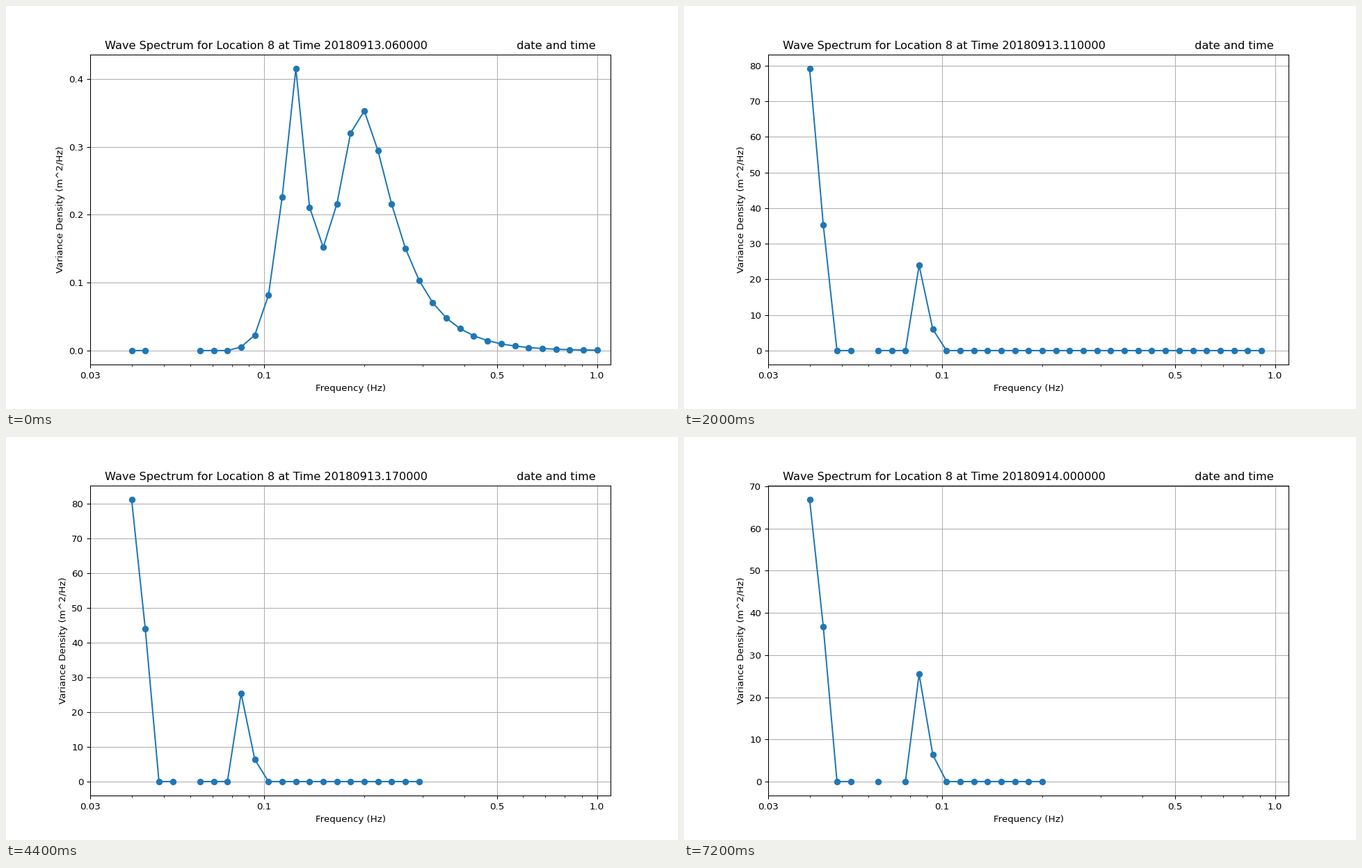
These frames come from a looping animation (966 by 580 pixels, 7.6 s). A matplotlib script:

```python
import numpy as np
import matplotlib.pyplot as plt
from matplotlib.animation import FuncAnimation
from matplotlib.ticker import NullFormatter

HOURS = 19
FIRST_HOUR = 6
DPI = 96.6
BANDS = np.arange(35)
FREQS = np.geomspace(0.04, 1.0, len(BANDS))


def calm_spectrum():
    """A narrow swell peak beside a broad wind sea with a long tail."""
    d = BANDS - 12
    swell = 0.411 * np.exp(-np.where(d < 0, 0.6 * abs(d) ** 1.43,
                                     0.78 * abs(d) ** 1.15))
    d = BANDS - 16.8
    wind = 0.352 * np.exp(-np.where(d < 0, d ** 2 / 5.26,
                                    0.4 * (np.hypot(d, 1.35) - 1.35)))
    return np.where(BANDS < 8, 0, swell + wind)


def swell_spectrum(hour):
    """Two long-wave peaks that build up over the first hours."""
    density = np.zeros(len(BANDS))
    growth = 1 - np.exp(-(hour - 1) / 2.4)
    peak = np.interp(hour, [1, 3, 9, 11, 14], [70, 79.9, 77.75, 81.15, 66.9])
    density[0] = peak
    density[1] = 0.55 * growth * peak
    density[8] = 17 + 8.5 * growth
    density[9] = 0.25 * density[8]
    return density


def missing_bands(hour):
    last = round(np.interp(hour, [4.5, 11, 14, 18], [34, 21, 18, 17]))
    gaps = [4]
    if hour < 2:
        gaps += [2, 3]
    elif hour == 14:
        gaps += [2, 6, 7]
    elif hour > 14:
        gaps += [6]
    return (BANDS > last) | np.isin(BANDS, gaps)


def spectrum(hour):
    density = swell_spectrum(hour) if hour else calm_spectrum()
    return np.where(missing_bands(hour), np.nan, density)


def time_stamp(hour):
    days, clock = divmod(FIRST_HOUR + hour, 24)
    return f"{20180913 + days}.{clock:02d}0000"


# The small excess keeps rounding from dropping a pixel
fig, ax = plt.subplots(figsize=(966.01 / DPI, 580.01 / DPI), dpi=DPI)
ax.set_xscale("log")
ax.set_xlim(0.03, 1.1)
ax.set_xticks([0.03, 0.1, 0.5, 1.0], ["0.03", "0.1", "0.5", "1.0"])
ax.xaxis.set_minor_formatter(NullFormatter())
ax.set_xlabel("Frequency (Hz)")
ax.set_ylabel("Variance Density (m^2/Hz)")
ax.grid(True)
line, = ax.plot(FREQS, spectrum(0), "o-", color="tab:blue")


def update(hour):
    density = spectrum(hour)
    line.set_ydata(density)
    peak = np.nanmax(density)
    ax.set_ylim(-0.05 * peak, 1.05 * peak)
    ax.set_title(f"Wave Spectrum for Location 8 at Time {time_stamp(hour)}"
                 + " " * 25 + "date and time")
    return line,


anim = FuncAnimation(fig, update, frames=HOURS, interval=400, repeat=True,
                     repeat_delay=0, init_func=lambda: update(0))
plt.show()
```
